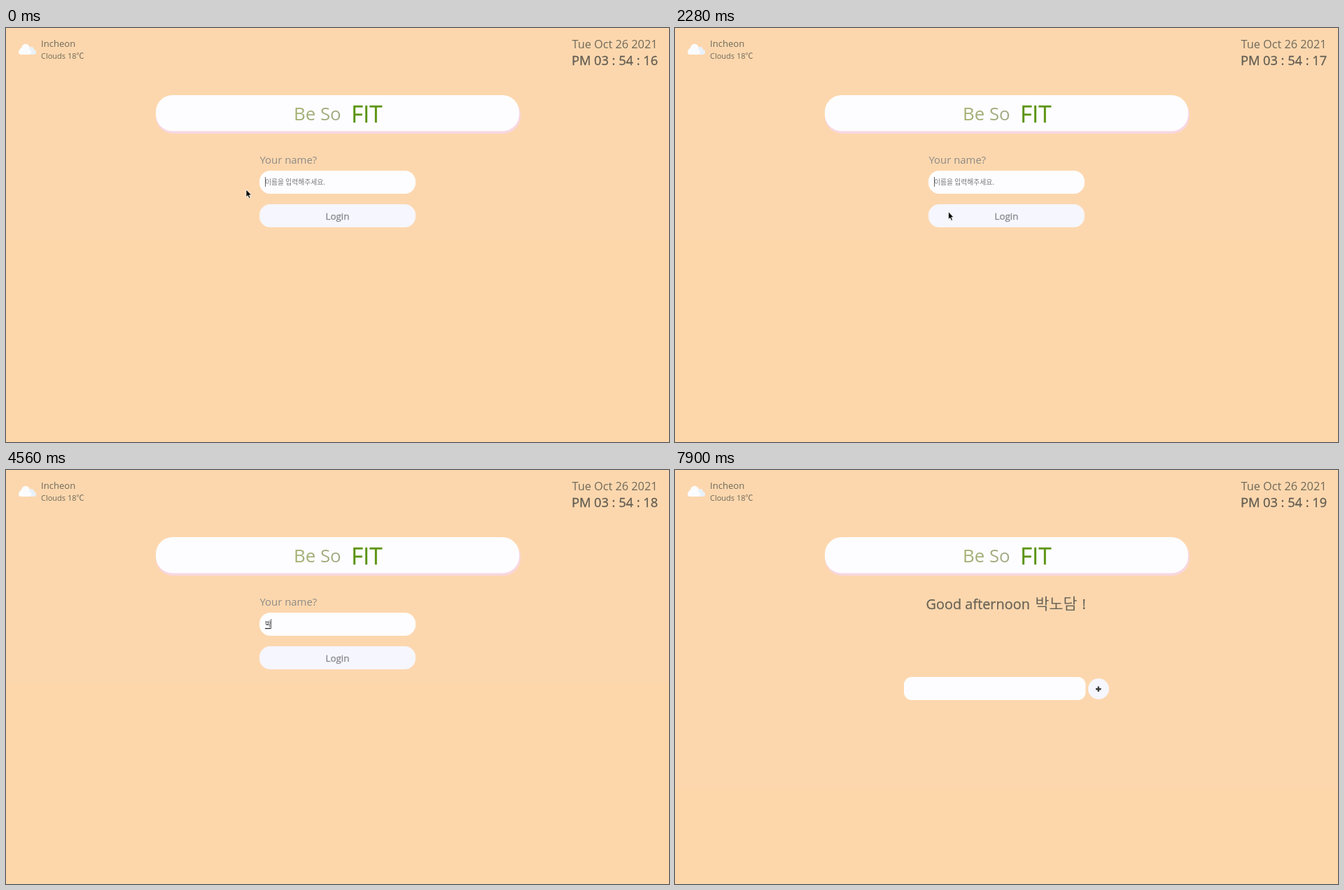
Animation, 947 px wide and 592 px high, one loop 8 s. Source, as an HTML page:

```html
<!DOCTYPE html>
<html>
<head>
<meta charset="utf-8">
<title>Daily list login</title>
<style>
  html, body { margin: 0; width: 100%; height: 100%; overflow: hidden; background: #fdd7a9; }
  svg { display: block; width: 947px; height: 592px; }
  text { font-family: "Open Sans", "Noto Sans CJK KR", sans-serif; white-space: pre; }
  .hangul { font-family: "Noto Sans CJK KR", "Noto Sans CJK", sans-serif; }
  .field { fill: #fdfdff; }
  .button { fill: #f6f6fe; }
  .mid { text-anchor: middle; }
  .strong { stroke: currentColor; stroke-width: .3; fill: currentColor; }
  .hidden { visibility: hidden; }
</style>
</head>
<body>
<svg viewBox="0 0 947 592">
  <defs>
    <linearGradient id="olive">
      <stop offset="0" stop-color="#a5b172"/>
      <stop offset="1" stop-color="#a2aa86"/>
    </linearGradient>
  </defs>
  <rect id="glow" width="947" height="304" fill="#fcd7ae"/>

  <g id="weather">
    <g fill="#e9f1fa">
      <circle cx="36" cy="31" r="4"/>
      <rect x="28" y="31" width="15" height="7" rx="3.5"/>
    </g>
    <g fill="#fbfcff">
      <circle cx="28" cy="28.5" r="5.8"/>
      <circle cx="23" cy="32" r="3.6"/>
      <rect x="18" y="31" width="18" height="7" rx="3.5"/>
    </g>
    <text x="50" y="27" font-size="13.1" fill="#6f6959">Incheon</text>
    <text x="50" y="43.5" font-size="11" fill="#6f6959">Clouds 18℃</text>
  </g>

  <text x="808.5" y="29" font-size="16.3" fill="#6f6959">Tue Oct 26 2021</text>
  <text id="clock" class="strong" x="808" y="53" font-size="18.2" color="#615c50"></text>

  <rect x="214" y="99" width="521" height="52" rx="25" fill="#f8d7e1"/>
  <rect class="field" x="214" y="96" width="519" height="51.5" rx="24"/>
  <text x="411" y="132" font-size="25.8" fill="url(#olive)">Be So</text>
  <text class="strong" x="493" y="135" font-size="33" color="#5d9413">FIT</text>

  <g id="login">
    <text x="362.5" y="194" font-size="14.9" fill="#8c8a85">Your name?</text>
    <rect class="field" x="362" y="204" width="223" height="33" rx="15.5"/>
    <text id="hint" class="hangul" x="370" y="223.5" font-size="9.8" fill="#777">이름을 입력해주세요.</text>
    <text id="typed" class="hangul" x="370" y="223.5" font-size="9.8" fill="#333"></text>
    <rect id="underline" y="226" width="8" height="1.2" fill="#222"/>
    <rect id="caret" y="213" width="1" height="14" fill="#666"/>
    <rect class="button" x="362" y="252" width="223" height="33" rx="15.5"/>
    <text class="mid strong" x="473.5" y="273.5" font-size="13.4" color="#88878c">Login</text>
  </g>

  <g id="greeting">
    <text class="strong" x="358.5" y="199" font-size="19.9" color="#6b6557">Good afternoon</text>
    <text class="hangul" x="514.5" y="199" font-size="21.7" fill="#6b6557">박노담</text>
    <text class="strong" x="581.5" y="199" font-size="19.9" color="#6b6557">!</text>
    <rect class="field" x="327" y="296" width="259.5" height="33" rx="11"/>
    <circle class="button" cx="605" cy="313" r="15"/>
    <path d="M601 313.2h7.6M604.8 309.4v7.6" stroke="#3b3b3b" stroke-width="2.4"/>
  </g>

  <g id="pointer">
    <path id="arrow" d="M0 0V10.8L2.4 8.6 4.2 12.6 6 11.8 4.3 7.9H7.6Z" fill="#000" stroke="#fff" stroke-width=".8"/>
    <path id="beam" d="M-2.5 -5.5Q0 -5.5 0 -4V4.5Q0 6 -2.5 6M2.5 -5.5Q0 -5.5 0 -4M0 4.5Q0 6 2.5 6M-1.2 2H1.2" fill="none" stroke="#333" stroke-width="1.1"/>
  </g>
</svg>
<script>
  const LOOP = 8000, SUBMIT = 7560, CHAR = 9;
  const $ = id => document.getElementById(id);
  const show = (id, on) => $(id).classList.toggle("hidden", !on);

  // [time, text in the name field]
  const keys = [
    [3900, "ㅂ"], [4120, "바"], [4400, "박"],
    [4880, "박ㄴ"], [5240, "박노"],
    [5900, "박노ㄷ"], [6340, "박노다"], [6780, "박노담"]
  ];
  const ticks = [750, 3250, 5850];
  const blinks = [1000, 2275, 3550];

  // [time, x, y]
  const path = [
    [0, 343, 231], [850, 343, 231], [1100, 362, 229], [1350, 394, 223],
    [1600, 403, 222], [1850, 403, 223], [2150, 398, 243],
    [2500, 378, 296], [2760, 366, 323], [LOOP, 366, 323]
  ];

  const passed = (times, t) => times.filter(time => t >= time).length;

  function pointerAt(t) {
    const i = path.findIndex(p => p[0] > t);
    const [t0, x0, y0] = path[i - 1], [t1, x1, y1] = path[i];
    const k = (t - t0) / (t1 - t0);
    return [x0 + (x1 - x0) * k, y0 + (y1 - y0) * k];
  }

  function draw(t) {
    const done = t >= SUBMIT;
    const count = passed(keys.map(k => k[0]), t);
    const name = count ? keys[count - 1][1] : "";
    const end = 370 + name.length * CHAR;

    $("clock").textContent = "PM 03 : 54 : " + (16 + passed(ticks, t));
    $("glow").setAttribute("height", done ? 457 : 304);
    $("login").style.display = done ? "none" : "";
    $("greeting").style.display = done ? "" : "none";

    $("typed").textContent = name;
    show("hint", !name);
    show("underline", name);
    $("underline").setAttribute("x", end - CHAR);
    show("caret", name || passed(blinks, t) % 2 === 0);
    $("caret").setAttribute("x", name ? end - 0.8 : 370);

    const [x, y] = pointerAt(t);
    const inField = x > 362 && x < 585 && y > 204 && y < 237;
    $("pointer").setAttribute("transform", `translate(${x} ${y})`);
    $("pointer").style.display = name ? "none" : "";
    show("arrow", !inField);
    show("beam", inField);
  }

  const start = performance.now();
  function frame() {
    draw((performance.now() - start) % LOOP);
    requestAnimationFrame(frame);
  }
  frame();
</script>
</body>
</html>
```
